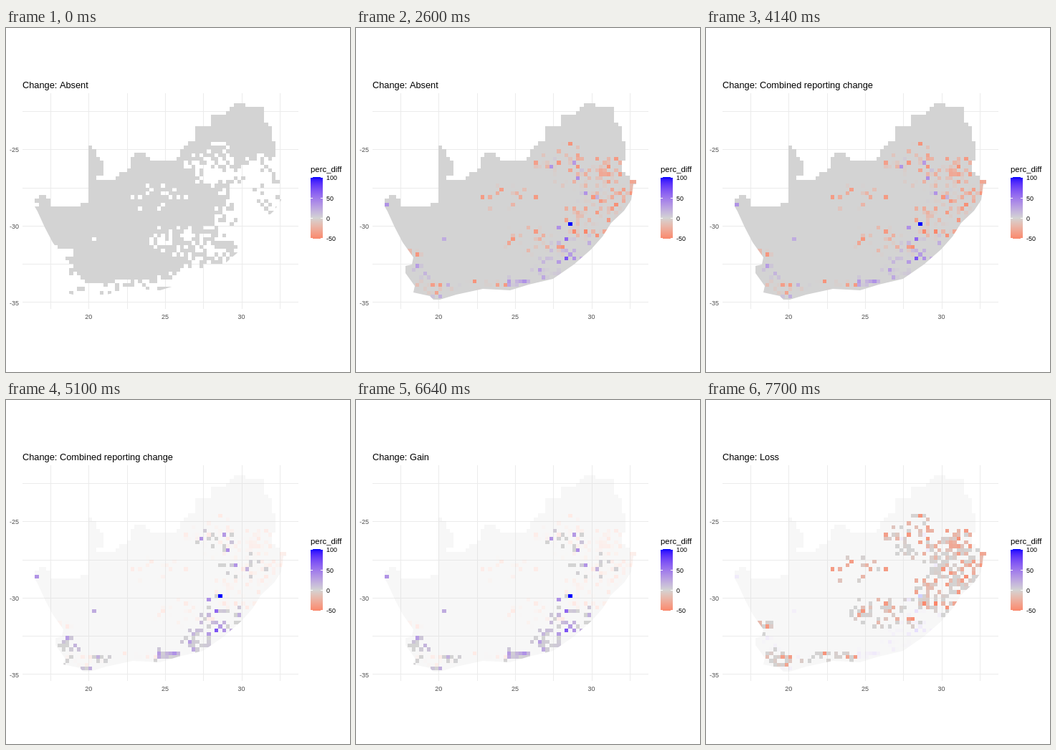
These frames come from a looping animation (480x480 px, 10 s). An HTML page with a canvas:

```html
<!DOCTYPE html>
<html>
<head>
<meta charset="utf-8">
<style>
html, body { margin: 0; width: 100%; height: 100%; overflow: hidden; background: #fff }
canvas { display: block }
</style>
</head>
<body>
<canvas id="stage" width="480" height="480"></canvas>
<script>
const ctx = document.getElementById('stage').getContext('2d');
const COLS = 66, ROWS = 52, SIZE = 16 / 3, LEFT = 40.3, TOP = 105.3;

const land = new Path2D(`M40 238H46V233H56V238H62V249H104V244H115V164H120V169H126V180H131V185H136V206H131V190
  V206H126V212H153V207H158V201H169V196H174V180H179V174H195V180H201V185H238V180H243V169H248V164H254V158
  H264V137H286V121H296V121H307V116H312V110H318V105H334V110H360V132H366V137H371V158H376V185H371V201H376V206H382V212
  H391V218H387L384 240 374 255 356 272 344 291 328 309 304 330 275 350 241 358 215 366 177 364
  140 372 117 379H108L103 374 80 369 82 360 69 342V332L78 330 80 320 65 299 54 278 44 256 40 249Z`);

// Regions where a kind of cell is common: centre x, y, radius x, y, peak density
const regions = {
  loss: [
    [350, 230, 50, 55, .6], [320, 270, 40, 36, .45], [290, 190, 44, 34, .4], [215, 240, 46, 24, .18],
    [250, 300, 65, 28, .3], [82, 320, 12, 16, .7], [108, 360, 30, 14, .65], [170, 358, 50, 9, .5]
  ],
  gain: [
    [293, 198, 36, 18, .5], [332, 236, 40, 26, .35], [300, 300, 38, 34, .5], [268, 335, 24, 24, .5],
    [222, 356, 32, 10, .7], [142, 360, 26, 8, .5], [88, 350, 18, 26, .45], [112, 374, 14, 6, .8]
  ],
  present: [
    [292, 207, 28, 11, 1], [360, 225, 40, 60, .6], [336, 275, 26, 45, 1], [290, 350, 70, 26, 1],
    [160, 378, 110, 18, 1], [72, 330, 17, 28, 1], [86, 358, 18, 22, 1]
  ]
};

// The most striking cells: x, y, value
const peaks = [
  [299, 273, 100], [293, 321, 70], [293, 294, 60], [43, 247, 35], [123, 294, 22],
  [304, 283, -50], [320, 283, -52], [288, 305, -45], [352, 193, -45]
];

const RED = [53.2, 80.1, 67.2], GREY = [84.6, 0, 0], BLUE = [32.3, 79.2, -107.9];

function labToRgb([l, a, b]) {
  const cube = f => f > 6 / 29 ? f ** 3 : (f - 4 / 29) * 108 / 841;
  const f = (l + 16) / 116;
  const x = .9505 * cube(f + a / 500), y = cube(f), z = 1.089 * cube(f - b / 200);
  const linear = [
    3.2406 * x - 1.5372 * y - .4986 * z,
    -.9689 * x + 1.8758 * y + .0415 * z,
    .0557 * x - .204 * y + 1.057 * z
  ];
  return `rgb(${linear.map(v => {
    const s = v > .0031308 ? 1.055 * v ** (1 / 2.4) - .055 : 12.92 * v;
    return Math.round(255 * Math.max(0, Math.min(1, s)));
  })})`;
}

function colour(value) {
  const end = value < 0 ? RED : BLUE, mix = Math.abs(value) / 100;
  return labToRgb(GREY.map((v, i) => v + (end[i] - v) * mix));
}

function noise(c, r, salt) {
  const n = Math.sin(c * 127.1 + r * 311.7 + salt * 74.7) * 43758.5453;
  return n - Math.floor(n);
}

function density(kind, x, y) {
  return Math.max(...regions[kind].map(([cx, cy, rx, ry, peak]) =>
    peak * (1 - (((x - cx) / rx) ** 2 + ((y - cy) / ry) ** 2) ** 2)));
}

function makeCell(c, r) {
  const x = LEFT + (c + .5) * SIZE, y = TOP + (r + .5) * SIZE;
  const peak = peaks.find(p => Math.abs(p[0] - x) < SIZE / 2 && Math.abs(p[1] - y) < SIZE / 2);
  if (peak) return { c, r, kind: peak[2] > 0 ? 'gain' : 'loss', fill: colour(peak[2]) };
  const kind = Object.keys(regions).find((k, i) => noise(c, r, i + 1) < density(k, x, y)) || 'absent';
  const n = noise(c, r, 4);
  const value = kind === 'loss' ? -45 * n ** 3 : kind === 'gain' ? 40 * n ** 4 : 0;
  return { c, r, kind, fill: colour(value) };
}

const cells = Array.from({ length: COLS * ROWS }, (_, i) => makeCell(i % COLS, Math.floor(i / COLS)));

// rest: opacity of the cells that are not of the scene's kind
const scenes = [
  { title: 'Absent', kind: 'absent', rest: 0 },
  { title: 'Combined reporting change', rest: 1 },
  { title: 'Gain', kind: 'gain', rest: .19 },
  { title: 'Loss', kind: 'loss', rest: .19 }
];

function text(str, x, y, size, fill = '#000', align = 'left') {
  ctx.font = `${size}px "Liberation Sans", Arial, sans-serif`;
  ctx.fillStyle = fill;
  ctx.textAlign = align;
  ctx.fillText(str, x, y);
}

function drawGrid() {
  ctx.fillStyle = '#ebebeb';
  for (let i = 0; i < 7; i++) ctx.fillRect(Math.round(62 + i * 53.3), 91, 1, 301);
  for (let i = 0; i < 6; i++) ctx.fillRect(23, Math.round(116 + i * 53.25), 385, 1);
  for (let i = 0; i < 3; i++) {
    text(20 + 5 * i, 115.3 + i * 106.6, 406, 9, '#4d4d4d', 'center');
    text(-25 - 5 * i, 18, 173 + i * 107, 9, '#4d4d4d', 'right');
  }
}

function drawMap({ kind, rest }) {
  ctx.save();
  ctx.clip(land);
  for (const cell of cells) {
    const x = Math.round(LEFT + cell.c * SIZE), y = Math.round(TOP + cell.r * SIZE);
    ctx.globalAlpha = cell.kind === kind ? 1 : rest;
    ctx.fillStyle = cell.fill;
    ctx.fillRect(x, y, Math.round(LEFT + (cell.c + 1) * SIZE) - x, Math.round(TOP + (cell.r + 1) * SIZE) - y);
  }
  ctx.restore();
}

function drawLegend() {
  text('perc_diff', 425, 201, 11.4);
  for (let i = 0; i < 86; i++) {
    ctx.fillStyle = colour(100 - i * 150 / 85);
    ctx.fillRect(425, 208 + i, 17, 1);
  }
  for (let i = 0; i < 4; i++) {
    const y = Math.round(208.4 + i * 28.2);
    ctx.fillStyle = '#fff';
    ctx.fillRect(425, y, 3, 1);
    ctx.fillRect(439, y, 3, 1);
    text(100 - 50 * i, 447, y + 4, 9);
  }
}

let shown = '';
function frame(now) {
  const t = now % 10000;
  const sceneAt = ms => ms < 2600 ? 0 : ms < 5100 ? 1 : ms < 7600 ? 2 : 3;
  const map = sceneAt(t), title = sceneAt(t - 100);
  if (shown !== `${map} ${title}`) {
    shown = `${map} ${title}`;
    ctx.fillStyle = '#fff';
    ctx.fillRect(0, 0, 480, 480);
    drawGrid();
    drawMap(scenes[map]);
    drawLegend();
    text('Change: ' + scenes[title].title, 23, 84, 12.8);
  }
  requestAnimationFrame(frame);
}
frame(performance.now());
</script>
</body>
</html>
```
